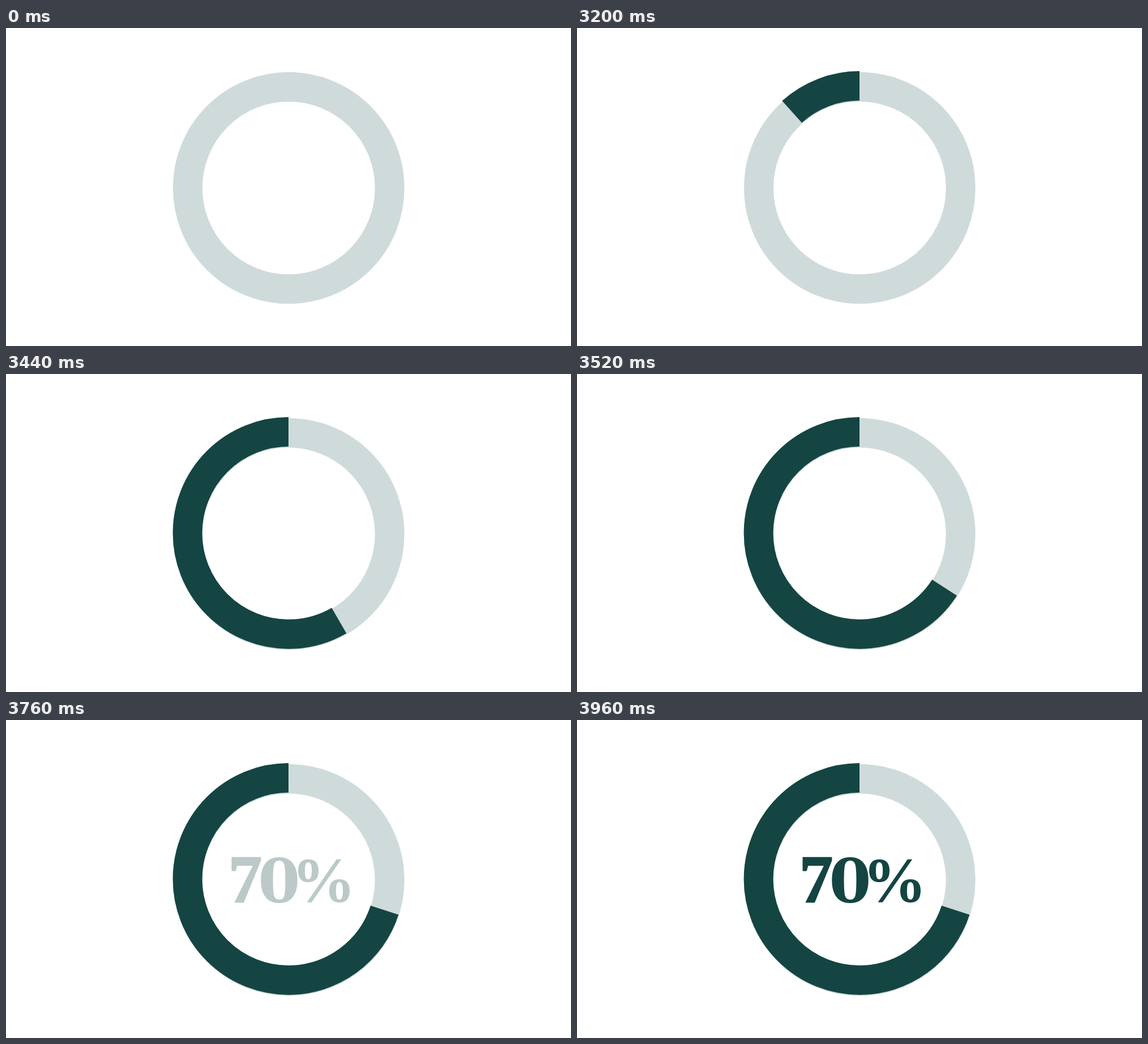
Write an HTML page that moves like this. It is 998 by 561 pixels and loops after 4 s.

```html
<!DOCTYPE html>
<html lang="en">
<head>
<meta charset="utf-8">
<title>70% ring</title>
<style>
  html, body { margin: 0; width: 100%; height: 100%; overflow: hidden; background: #fff; }
  svg { display: block; width: 100vw; height: 100vh; }
  circle { fill: none; stroke-width: 52; }
  .track { stroke: #cfdbda; }
  .fill { stroke: #144542; visibility: hidden; }
  .label {
    font: bold 118px "Liberation Serif", "Times New Roman", serif;
    text-anchor: middle;
    fill: #144542;
    opacity: 0;
  }
  .seven { stroke: #144542; stroke-width: 2.5; }
  .zero { font: bold 107px "DejaVu Serif", serif; }
  .percent { font-size: 113px; }
</style>
</head>
<body>
<svg viewBox="0 0 998 561">
  <circle class="track" cx="499.3" cy="282.2" r="178.4"/>
  <!-- mirrored and turned, so the arc grows counterclockwise from the top -->
  <circle class="fill" r="178.4" pathLength="360"
          transform="translate(499 280.5) scale(-1 1) rotate(-90)"/>
  <text class="label" y="320.5"><tspan class="seven" x="422.5">7</tspan><tspan class="zero" x="482.5">0</tspan><tspan class="percent" x="561">%</tspan></text>
</svg>
<script>
  const LOOP = 4000, STEP = 40, SWEEP = 252;
  const fill = document.querySelector('.fill');
  const label = document.querySelector('.label');

  const progress = (t, start, end) => Math.min(1, Math.max(0, (t - start) / (end - start)));
  const cubicInOut = u => u < 0.5 ? 4 * u ** 3 : 1 - 4 * (1 - u) ** 3;

  function draw() {
    const t = Math.floor(performance.now() % LOOP / STEP) * STEP;
    const angle = SWEEP * cubicInOut(progress(t, 2929, 3711));
    fill.style.visibility = t < 3000 ? 'hidden' : 'visible';
    fill.style.strokeDasharray = `${angle} 360`;
    label.style.opacity = progress(t, 3680, 3960);
    requestAnimationFrame(draw);
  }
  draw();
</script>
</body>
</html>
```
